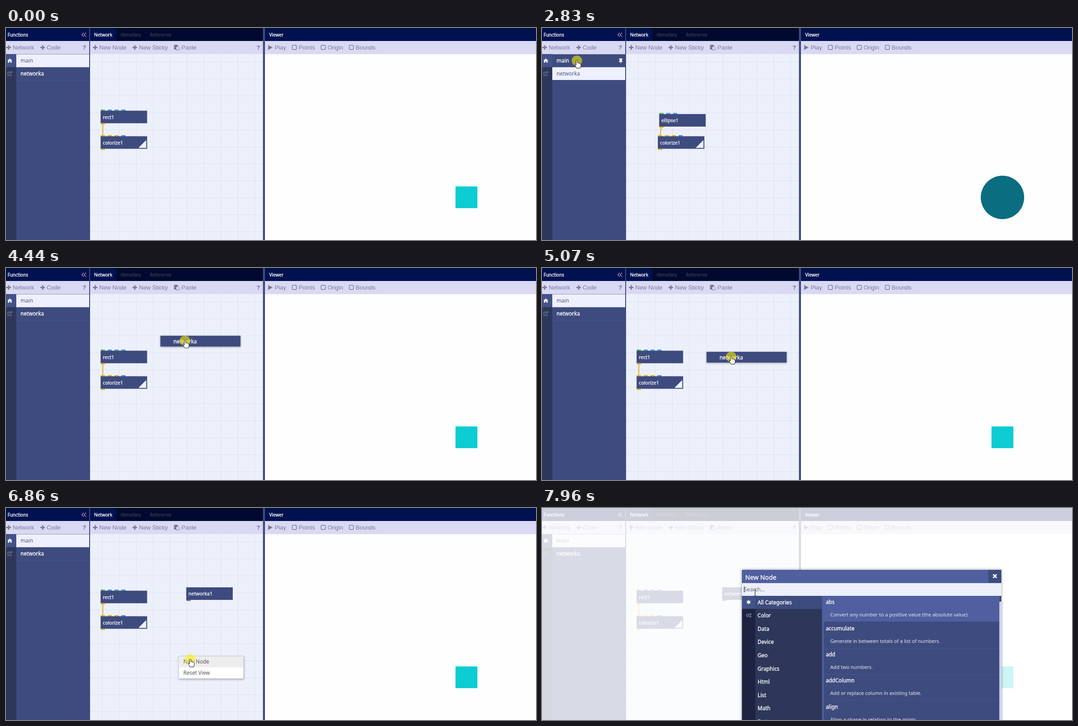
Animation of 1185 by 473 pixels, one loop 8000 ms. Source, as an HTML page:

```html
<!DOCTYPE html>
<html lang="en">
<head>
<meta charset="utf-8">
<title>Node editor</title>
<style>
html, body { margin: 0; width: 100%; height: 100%; overflow: hidden; background: #fefefe; }
svg { display: block; width: 100%; height: 100%; }
text { font: 11.8px "Noto Sans", "Open Sans", sans-serif; stroke-width: 0; white-space: pre; }
.md { stroke-width: .35px; }
.tab { font-size: 10.1px; }
.node { font-size: 10.7px; }
.desc { font-size: 11px; stroke-width: .1px; }
.title { font-size: 14.2px; }
.tool { font: 13px "Liberation Sans", Arial, sans-serif; }
.help { font: bold 12px "Liberation Sans", Arial, sans-serif; }

.move { animation: move 8s linear infinite; }
.on { animation: 8s step-end infinite; }
.net-a { animation-name: net-a; }
.net-b { animation-name: net-b; }
.pin1 { animation-name: pin1; }
.pin2 { animation-name: pin2; }
.pointer { animation-name: pointer; }
.arrow { animation-name: arrow; }
.hand { animation-name: hand; }
.beam { animation-name: beam; }
.halo { animation-name: halo; }
.ghost { animation-name: ghost; }
.dropped { animation-name: dropped; }
.menu { animation-name: menu; }
.hover { animation-name: hover; }
.dialog { animation-name: dialog; }
.caret { animation-name: caret; }

@keyframes move {
  0%, 10.375% { transform: translate(50px, 405px); }
  13.75% { transform: translate(58px, 240px); }
  16.875% { transform: translate(70px, 125px); }
  19%, 28.5% { transform: translate(74px, 101px); }
  35%, 43.125% { transform: translate(78px, 72px); }
  47.5%, 51% { transform: translate(78px, 101px); }
  51.625% { transform: translate(88px, 103px); }
  55.5% { transform: translate(400px, 161px); }
  57.5% { transform: translate(435px, 188px); }
  61.5% { transform: translate(423px, 195.5px); }
  62.5%, 69.5% { transform: translate(423px, 197px); }
  76%, 79.5% { transform: translate(387px, 330px); }
  83.75%, 91.25% { transform: translate(412px, 337px); }
  96.25%, 100% { transform: translate(476.5px, 189px); }
}
@keyframes net-a { 0%, 37.875%, 100% { opacity: 1 } 23.25% { opacity: 0 } }
@keyframes net-b { 0%, 37.875%, 100% { opacity: 0 } 23.25% { opacity: 1 } }
@keyframes pin1 { 0%, 45.625%, 100% { opacity: 0 } 31.25% { opacity: 1 } }
@keyframes pin2 { 0%, 31.25%, 51.625%, 100% { opacity: 0 } 17.5%, 45.625% { opacity: 1 } }
@keyframes pointer { 0% { opacity: 0 } 10.375%, 100% { opacity: 1 } }
@keyframes arrow { 0%, 64.375% { opacity: 1 } 17.5%, 80%, 100% { opacity: 0 } }
@keyframes hand { 0%, 64.375%, 95.25%, 100% { opacity: 0 } 17.5%, 80% { opacity: 1 } }
@keyframes beam { 0% { opacity: 0 } 95.25%, 100% { opacity: 1 } }
@keyframes halo {
  0%, 23.25%, 37.875%, 64.375%, 78.125%, 86.75%, 99.4%, 100% { opacity: 0 }
  21.25%, 35.25%, 49.625%, 76.125%, 83.875%, 98.375% { opacity: 1 }
}
@keyframes ghost { 0%, 64.375%, 100% { opacity: 0 } 51.625% { opacity: 1 } }
@keyframes dropped { 0% { opacity: 0 } 64.375%, 100% { opacity: 1 } }
@keyframes menu { 0%, 86.75%, 100% { opacity: 0 } 78.125% { opacity: 1 } }
@keyframes hover { 0% { opacity: 0 } 80%, 100% { opacity: 1 } }
@keyframes dialog { 0% { opacity: 0 } 86.75%, 100% { opacity: 1 } }
@keyframes caret { 0% { opacity: 0 } 99.4%, 100% { opacity: 1 } }
</style>
</head>
<body>
<script>
const SLATE = '#3e4b7e', DARK = '#2d3759', NAVY = '#00114f', PALE = '#ecf0fb';
const GREY = '#7b7a98', BRIGHT = '#4f5f9f', LINE = '#475589';
const ORANGE = '#e8b022', BLUE = '#4c9bcd', GREEN = '#52b562';

const rect = (x, y, w, h, fill, more = '') =>
  `<rect x="${x}" y="${y}" width="${w}" height="${h}" fill="${fill}" ${more}/>`;
const path = (d, fill, more = '') => `<path d="${d}" fill="${fill}" ${more}/>`;
const line = (d, color, width, more = '') => path(d, 'none', `stroke="${color}" stroke-width="${width}" ${more}`);
const text = (x, y, str, fill, cls = '') =>
  `<text x="${x}" y="${y}" fill="${fill}" stroke="${fill}" class="${cls}">${str}</text>`;
const at = (x, y, body) => `<g transform="translate(${x} ${y})">${body}</g>`;
const group = (cls, ...body) => `<g class="on ${cls}">${body.join('')}</g>`;

const plus = x => line(`M${x - 5} 43.5h10M${x} 38.5v10`, GREY, 3);
const check = x => rect(x, 38.5, 9.5, 9.5, 'none', `rx="2" stroke="${GREY}" stroke-width="1.4"`);
const tool = (x, str) => text(x, 48, str, GREY, 'tool');
const help = x => text(x, 48, '?', '#68678a', 'help');
const pin = (y, fill, cls) => group(cls, at(176, y,
  path('M-4-5.5H4V-4H2.6V0L4.8 2.2H.7L0 6.5L-.7 2.2H-4.8L-2.6 0V-4H-4Z', fill)));

function node(x, y, name, ports, out, selected) {
  let s = ports.map((c, i) => rect(x + .5 + i * 15.2, y - 2.5, 9.5, 3, c)).join('');
  s += rect(x, y, 104, 28, SLATE) + rect(x + .5, y + 28, 9.5, 2.5, out);
  if (selected) s += path(`M${x + 102} ${y + 8.5}v17.5h-17.5z`, PALE);
  return s + text(x + 5, y + 18.3, name, '#f4f5fc', 'md node');
}

// Function list: the open network is the light row.
function rows(open) {
  return ['main', 'networka'].map((name, i) => {
    const y = 59 + i * 29, active = i === open;
    return (active ? rect(23, y - (i ? .5 : 0), 163, 28.5, '#eef1fd') : line(`M23 ${y + 57.5 - i * 29 - (i ? 0 : 29)}h163`, LINE, 1)) +
      text(32.5, y + 18, name, active ? '#4d557f' : '#fff', active ? '' : 'md') +
      pin(y + 14.5, active ? SLATE : '#fff', 'pin' + (i + 1));
  }).join('');
}

function chrome() {
  let grid = '';
  for (let k = 0; k < 10; k++) grid += `M${Math.round(216 + 37.9 * k) - .5} 58v415`;
  for (let k = 0; k < 11; k++) grid += `M188 ${Math.round(75 + 37.9 * k) + .5}h387`;
  return rect(0, 0, 1185, 473, '#fefefe') +
    rect(0, 0, 1185, 29, NAVY) + rect(247, 0, 328, 29, '#000a30') + rect(0, 0, 1185, 1, '#00041f') +
    rect(0, 29, 1185, 29.5, '#dad9f4') +
    rect(188, 58.5, 387, 415, PALE) + line(grid, '#dfe0f1', 1) +
    rect(0, 58.5, 187, 415, SLATE) + rect(0, 58.5, 23, 415, DARK) + rect(0, 58.5, 23, 29, '#435289') +
    rect(186, 0, 2, 473, SLATE) + rect(574.5, 0, 4.5, 473, SLATE) +
    text(3.5, 18.5, 'Functions', '#fff', 'md tab') +
    line('M174 10.5l-4.5 4.5 4.5 4.5M179 10.5l-4.5 4.5 4.5 4.5', '#c795ae', 1.4) +
    text(197, 18.5, 'Network', '#fff', 'md tab') +
    text(256.5, 18.5, 'Metadata', '#4a4858', 'tab') +
    text(321.5, 18.5, 'Reference', '#4a4858', 'tab') +
    text(588.5, 18.5, 'Viewer', '#fff', 'md tab') +
    plus(6) + tool(15, 'Network') + plus(82) + tool(91, 'Code') + help(171.5) +
    plus(199.5) + tool(208.5, 'New Node') + plus(288) + tool(297.5, 'New Sticky') +
    rect(375.5, 38, 9, 10, GREY) + rect(378, 37, 4, 2, GREY) +
    path('M380.5 41.5h4.5l2.5 2.5v5h-7z', '#dad9f4', `stroke="${GREY}"`) +
    tool(392.5, 'Paste') + help(560.5) +
    path('M586 38l10.5 5.5L586 49z', GREY) + tool(601, 'Play') +
    check(640) + tool(654.5, 'Points') + check(704.5) + tool(719, 'Origin') +
    check(767.5) + tool(782, 'Bounds') +
    path('M8.5 68l5.5 5h-1.5v4.5H9.8v-3H7.2v3H4.5V73H3z', '#fff') +
    line('M9 98.5H4v7.5h7.5V103M6.5 103.5L13 97.5M9.5 97.5H13V101', '#6b7594', 1.3);
}

function networks() {
  const tints = [ORANGE, ORANGE, ORANGE, BLUE];
  return group('net-a', rows(0),
      line('M216.5 213v28', ORANGE, 2),
      node(211.5, 184.5, 'rect1', [GREEN, BLUE, BLUE, BLUE], ORANGE),
      node(211.5, 241.5, 'colorize1', tints, ORANGE, true),
      rect(1005, 353.5, 49, 48.5, '#0dcdd2')) +
    group('net-b', rows(1),
      line('M267 220L264 241', ORANGE, 2),
      node(262, 192, 'ellipse1', [GREEN, BLUE, BLUE], ORANGE),
      node(259, 241.5, 'colorize1', tints, ORANGE, true),
      '<circle cx="1029.5" cy="378" r="48.5" fill="#0a6d80"/>') +
    group('dropped', node(403, 177, 'networka1', [], '#747a90'));
}

function menu() {
  return group('menu',
    rect(386, 330.5, 145, 50, '#fff', 'stroke="#c9c9d2" style="filter:drop-shadow(1px 2px 2px #0004)"'),
    group('hover', rect(386.5, 331, 144, 24.5, '#ededed')),
    text(396.5, 346.5, 'New Node', '#55555f'), text(396.5, 371.5, 'Reset View', '#55555f'));
}

function dialog() {
  const kinds = ['All Categories', 'Color', 'Data', 'Device', 'Geo', 'Graphics', 'Html', 'List', 'Math', 'State'];
  const items = [
    ['abs', 'Convert any number to a positive value (the absolute value).'],
    ['accumulate', 'Generate in between totals of a list of numbers.'],
    ['add', 'Add two numbers.'],
    ['addColumn', 'Add or replace column in existing table.'],
    ['align', 'Align a shape in relation to the origin.']
  ];
  const cog = (x, y, r) =>
    `<circle cx="${x}" cy="${y}" r="${r}" fill="none" stroke="#6b7594" stroke-width="1.8"/>`;
  return group('dialog',
    rect(0, 0, 1185, 473, '#fff', 'opacity=".8"'),
    rect(447, 138, 580, 340, SLATE, 'style="filter:drop-shadow(0 0 3px #0006)"'),
    rect(447, 138, 580, 29.5, BRIGHT), rect(998, 138, 29, 29.5, SLATE),
    line('M1008.5 148l8 8m0-8l-8 8', '#fff', 2.8),
    text(454.5, 160, 'New Node', '#fff', 'md title'),
    rect(447, 167.5, 580, 28.5, PALE), text(451.5, 186, 'Search...', '#6a6b80'),
    rect(447, 196, 30, 277, '#1d2340'), rect(447, 196, 30, 29, '#435289'),
    rect(477, 196, 149, 277, DARK), rect(477, 196, 149, 29, SLATE),
    line('M462 205.5v9M458 207.8l8 4.4M466 207.8l-8 4.4', '#fff', 2.2),
    cog(459.8, 239.5, 2.6), cog(465.8, 236.8, 1.4), cog(465.8, 242.2, 1.4),
    kinds.map((k, i) => text(482, 214.5 + i * 29.6, k, '#fff', 'md')).join(''),
    rect(626, 196, 4, 277, BRIGHT), rect(630, 196, 392.5, 57.5, BRIGHT),
    items.map(([name, about], i) => {
      const y = 214.3 + i * 58.3;
      return text(634.5, y, name, '#fff', 'md') + text(644.5, y + 28, about, '#d9dcec', 'desc') +
        (i ? line(`M630 ${Math.round(y + 40) + .5}h392`, LINE, 1) : '');
    }).join(''),
    rect(1022.5, 209, 4.5, 264, '#cfd5f0'),
    group('caret', rect(451.5, 174.5, 1.2, 14, '#22263c')));
}

function cursor() {
  const edge = 'stroke="#111" stroke-width="1" stroke-linejoin="round"';
  return `<g class="move">` +
    group('ghost', at(-55, -10,
      rect(0, 0, 179, 24, SLATE, 'style="filter:drop-shadow(0 1px 2px #0006)"') +
      text(29, 17, 'networka', '#fff', 'md'))) +
    group('halo', '<circle cy="1" r="11.6" fill="#fff000" fill-opacity=".57"/>') +
    group('pointer',
      group('arrow', path('M0 0V16L3.7 12.5L6.2 18.3L8.6 17.2L6.1 11.6H11Z', '#fff', edge)),
      group('hand', path('M-1.6 1Q0-1.5 1.6 1V6Q3.5 5 4.3 6.7Q6 5.9 6.8 7.5Q8.8 7 9 9.5V13L7.5 17.5H-.5' +
        'L-4 11.5Q-5 9-3 9L-1.6 10.5Z', '#fff', edge)),
      group('beam', line('M-2.5-6h2M.5-6h2M0-5.5v12M-2.5 7h2M.5 7h2', '#111', 1.1))) +
    '</g>';
}

document.body.innerHTML =
  `<svg viewBox="0 0 1185 473">${chrome()}${networks()}${menu()}${dialog()}${cursor()}</svg>`;
</script>
</body>
</html>
```
